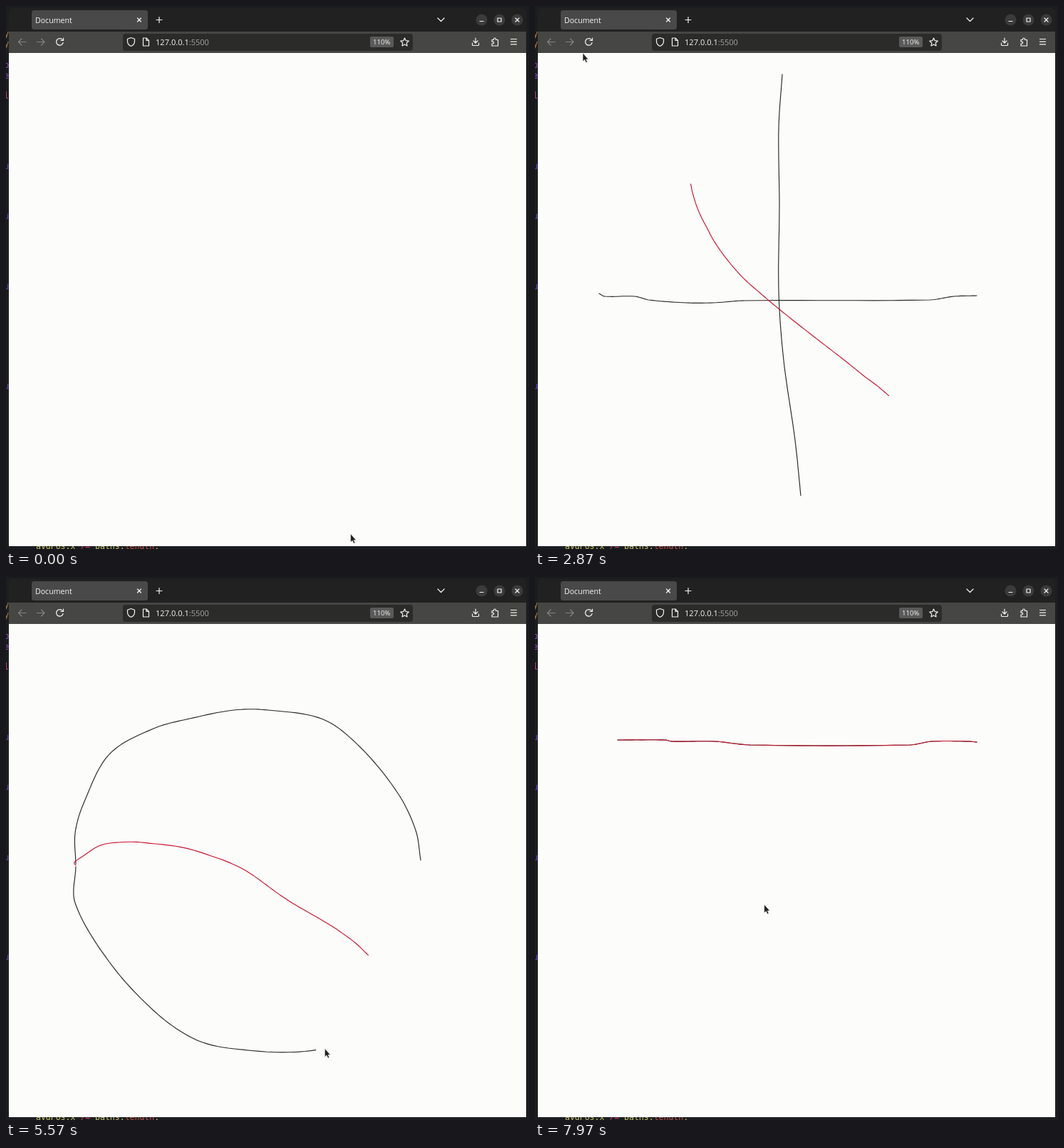
Animation of 734 by 763 pixels, one loop 8 s. Source, as an HTML page:

```html
<!DOCTYPE html>
<html lang="en">
<head>
<meta charset="utf-8">
<title>Average path</title>
<style>
  html, body { margin: 0; width: 100%; height: 100%; overflow: hidden; background: #1b1e20; }
  svg { display: block; width: 100%; height: 100%; }
  text { font-family: "Open Sans", "Noto Sans", sans-serif; }
  .code text, text.code { font: 11.5px "DejaVu Sans Mono", monospace; }
  .icon { fill: none; stroke: #f4f4f2; stroke-width: 1.2; stroke-linecap: round; stroke-linejoin: round; }
  .pen { fill: none; stroke-width: 1.15; stroke-linejoin: round; stroke-linecap: round; }
</style>
</head>
<body>
<svg viewBox="0 0 734 763">
  <rect width="734" height="763" fill="#1b1e20"/>
  <g class="code" id="edge"></g>
  <text class="code" x="42" y="763" fill="#c9c46a">avgPos.x <tspan fill="#d0405c">/=</tspan> paths.<tspan fill="#c0504c">length</tspan>;</text>

  <path d="M4 759V9q0-6 6-6H724q6 0 6 6V759Z" fill="#212121"/>
  <rect x="4" y="36" width="726" height="30" fill="#464644"/>
  <rect x="4" y="66" width="726" height="693" fill="#fcfcfa"/>
  <rect x="36" y="6" width="163" height="27" rx="3.5" fill="#494949"/>
  <rect x="164" y="39" width="407" height="24" rx="4" fill="#2b2b2a"/>
  <rect x="511" y="43" width="33" height="15" rx="2" fill="#5a5a5a"/>
  <g fill="#f6f6f4">
    <text x="41" y="23.5" font-size="10.6">Document</text>
    <text x="210" y="54.6" font-size="11.05">127.0.0.1<tspan fill="#a3a3a0">:5500</tspan></text>
    <text x="515" y="54" font-size="9.6">110%</text>
  </g>
  <g fill="#3b3b3b">
    <circle cx="667.5" cy="19.5" r="8"/><circle cx="692.5" cy="19.5" r="8"/><circle cx="717.5" cy="19.5" r="8"/>
  </g>
  <g class="icon">
    <path d="M184.5 17l5 5m0-5l-5 5M211 19.5h8m-4-4v8M606 17l4.500 4.500 4.500-4.500"/>
    <path d="M665 21.5h5M690 17h5v5h-5ZM715 17l5 5m0-5l-5 5"/>
    <path d="M28 50.5H17.5m4.5-4.5l-4.5 4.5 4.5 4.5M43.5 50.5H54m-4.5-4.5l4.5 4.5-4.5 4.5" stroke="#85847c"/>
    <path d="M79.3 47.5a4.8 4.8 0 1 0 .8 4M80.5 45v3.5H77"/>
    <path d="M175.500 44.500l5 1.800v3.200q0 4.800-5 7-5-2.200-5-7v-3.200Z"/>
    <path d="M192.500 45h4.500l3.500 3.500v7.500h-8Zm4.500 0v3.500h3.500"/>
    <path d="M559.500 45l1.700 3.700 4 .5-3 2.700.8 4-3.500-2-3.500 2 .8-4-3-2.700 4-.5Z"/>
    <path d="M659 45v7m-3-3l3 3 3-3M654.500 52v2.500q0 1 1 1h7q1 0 1-1V52"/>
    <path d="M682 47.500h2.500v-1a1.500 1.500 0 0 1 3 0v1h3v8.500h-8.500v-3h1.200a1.400 1.400 0 0 0 0-2.800H682Z"/>
    <path d="M708.500 46.500h8m-8 3.700h8m-8 3.700h8"/>
  </g>

  <g id="ink" class="pen" stroke="#262626"></g>
  <path id="mean" class="pen" stroke="#c6142c"/>
  <path id="cursor" d="M0 0V12l2.700-2.300 1.800 4 2-.9-1.700-3.800H8Z" fill="#222" stroke="#fff" stroke-width=".8" stroke-opacity=".8"/>
</svg>
<script>
const LOOP = 8000, LAG = 20, SAMPLES = 110, STEPS = 10;
const $ = id => document.getElementById(id);
const svgNode = (tag, parent, attrs) => {
  const el = document.createElementNS("http://www.w3.org/2000/svg", tag);
  for (const k in attrs) el.setAttribute(k, attrs[k]);
  return parent.appendChild(el);
};
const clamp = x => Math.max(0, Math.min(1, x));
const mix = (a, b, f) => a + (b - a) * f;
const mixPoint = (p, q, f) => [mix(p[0], q[0], f), mix(p[1], q[1], f)];
const dist = (p, q) => Math.hypot(q[0] - p[0], q[1] - p[1]);

// Smooth curve through the points; tangents weighted by chord length so it never overshoots
function smooth(pts) {
  const slope = i => {
    const p = pts[Math.max(i - 1, 0)], q = pts[Math.min(i + 1, pts.length - 1)];
    const d = dist(p, pts[i]) + dist(pts[i], q);
    return [(q[0] - p[0]) / d, (q[1] - p[1]) / d];
  };
  const out = [pts[0]];
  for (let i = 1; i < pts.length; i++) {
    const p = pts[i - 1], q = pts[i], d = dist(p, q), m = slope(i - 1), n = slope(i);
    for (let s = 1; s <= STEPS; s++) {
      const f = s / STEPS, e = f * f * (3 - 2 * f);
      out.push([0, 1].map(k => mix(p[k], q[k], e) + d * f * (1 - f) * ((1 - f) * m[k] - f * n[k])));
    }
  }
  return out;
}

// A hand-drawn stroke; wave bends its speed: harmonics added to linear progress
function stroke(start, end, clear, points, wave = []) {
  const pts = smooth(points.split(" ").map(p => p.split(",").map(Number)));
  const lens = [0];
  for (let i = 1; i < pts.length; i++) lens.push(lens[i - 1] + dist(pts[i - 1], pts[i]));
  const reach = f => lens.at(-1) * wave.reduce((sum, a, k) => sum + a * Math.sin((k + 1) * Math.PI * f), f);
  const at = f => {
    const len = reach(f), i = Math.max(1, lens.findIndex(l => l >= len - 1e-6));
    return mixPoint(pts[i - 1], pts[i], (len - lens[i - 1]) / (lens[i] - lens[i - 1]));
  };
  return {
    start, end, clear, at,
    el: svgNode("path", $("ink"), {}),
    progress: t => clamp((t - start) / (end - start)),
    upTo: f => [...pts.filter((_, i) => lens[i] < reach(f)), at(f)]
  };
}

const strokes = [
  stroke(430, 1050, 3080,
    "90,404 98,408 140,408 160,413 212,417 250,417 295,414 554,413 588,408 620,407", [-0.12, -0.035]),
  stroke(1690, 2515, 3080,
    "347,96 342,172 343,280 342,400 349,498 365,610 373,688"),
  stroke(3622, 4425, 6860,
    "98,403 97,360 109,318 145,249 207,213 258,199 320,187 368,187 445,200 498,240 550,304 575,356 582,398",
    [0.044, -0.047, -0.026]),
  stroke(4837, 6370, 6860,
    "98,407 97,458 145,541 208,610 262,648 312,662 420,666.5 497,643 535,583 549,548 555,515 580,456 576,410",
    [0.12, -0.022, -0.022]),
  stroke(7150, 7720, LOOP,
    "116,229 183,229 192,231 252,231 302,236 526,236 557,231 609,231 620,232")
];

// Where the pointer rests or passes between strokes: time, x, y
const moves = [
  [0, 484, 742], [1430, 400, 129], [2870, 67, 66], [2990, 75, 50], [3150, 75, 50],
  [6410, 573, 409], [6670, 62, 72], [6800, 75, 50], [7970, 322, 460], [LOOP, 300, 462]
].concat(strokes.flatMap(s => [[s.start, ...s.at(0)], [s.end, ...s.at(1)]]))
  .sort((a, b) => a[0] - b[0]);

function pointer(t) {
  const s = strokes.find(s => t >= s.start && t <= s.end);
  if (s) return s.at(s.progress(t));
  const i = moves.findIndex(m => m[0] > t), a = moves[i - 1], b = moves[i];
  const f = (t - a[0]) / (b[0] - a[0]);
  return mixPoint(a.slice(1), b.slice(1), mix(f, f * f * (3 - 2 * f), 0.5));
}

const toPath = pts => pts.length ? "M" + pts.map(p => p.map(v => v.toFixed(1)).join(" ")).join("L") : "";

function meanPath(live, t) {
  if (live.length < 2) return live.flatMap(s => s.upTo(s.progress(t)));
  return Array.from({ length: SAMPLES + 1 }, (_, i) => {
    const [p, q] = live.map(s => s.at(i / SAMPLES * s.progress(t)));
    return mixPoint(p, q, 0.5);
  });
}

function draw(t) {
  const pen = t - LAG;
  const live = strokes.filter(s => pen >= s.start && t < s.clear);
  for (const s of strokes) s.el.setAttribute("d", live.includes(s) ? toPath(s.upTo(s.progress(pen))) : "");
  $("mean").setAttribute("d", toPath(meanPath(live, pen)));
  const [x, y] = pointer(t);
  $("cursor").setAttribute("transform", `translate(${x.toFixed(1)} ${y.toFixed(1)})`);
}

// Letters of the editor peeking out behind the window
const letters = (text, ys, fill) => ys.forEach((y, i) =>
  svgNode("text", $("edge"), { x: -2.8, y, fill }).textContent = text[i]);
letters("yy", [43, 57], "#b9803c");
letters("pe", [87, 102], "#a04fd0");
letters("l", [130], "#e0408c");
letters("uuuu", [229, 299, 398, 538], "#6a4fd0");

const began = performance.now();
function tick() {
  draw((performance.now() - began) % LOOP);
  requestAnimationFrame(tick);
}
tick();
</script>
</body>
</html>
```
